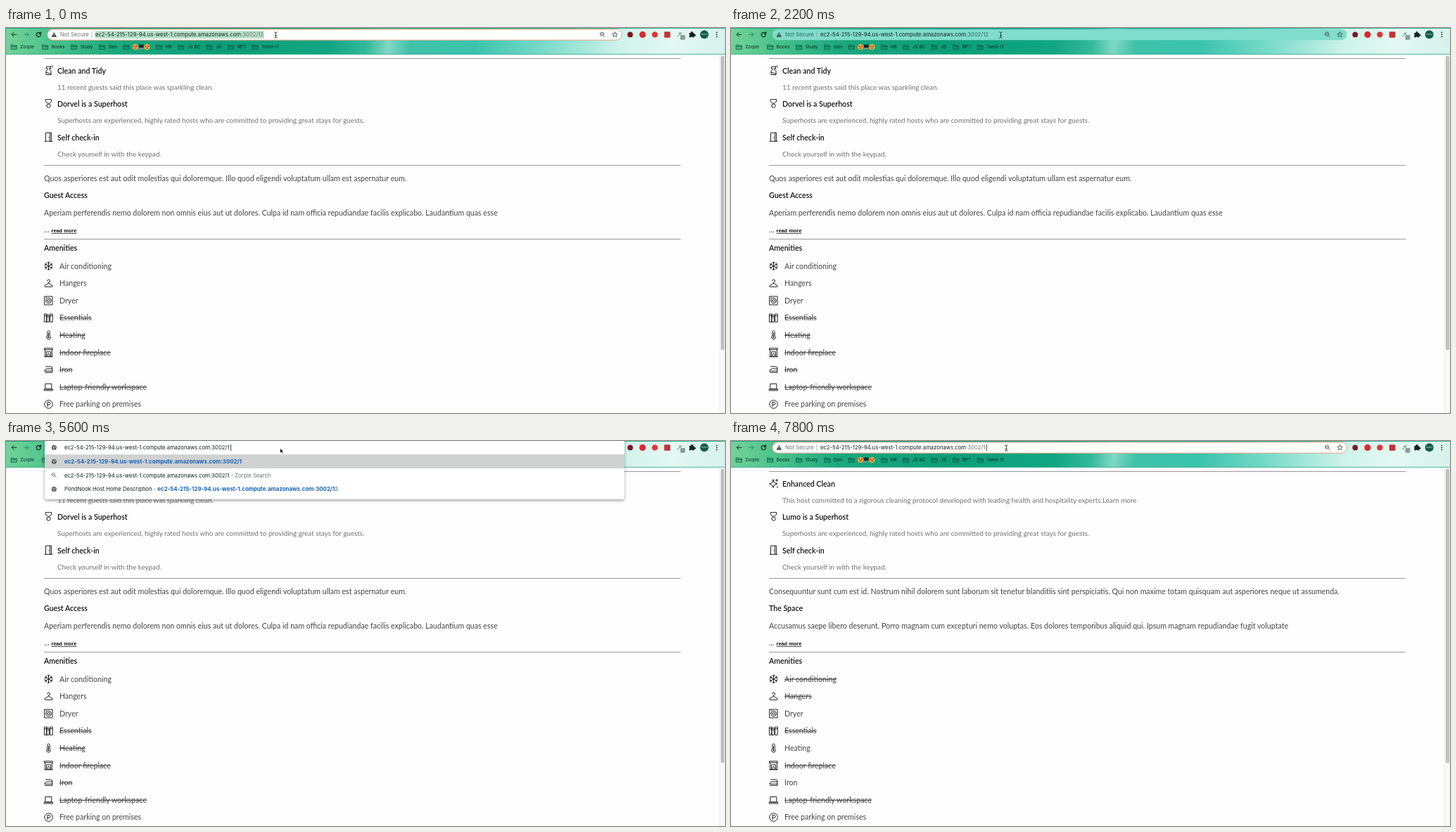
Write an HTML page that moves like this. It is 1022 by 548 pixels and loops after 8 s.

```html
<!DOCTYPE html>
<html lang="en">
<head>
<meta charset="utf-8">
<title>Host home description</title>
<style>
  html, body { margin: 0; width: 100%; height: 100%; overflow: hidden; background: #fefefe; }
  svg { display: block; width: 100vw; height: 100vh; }
  text { white-space: pre; }
  .ui { font-family: Inter, "Liberation Sans", sans-serif; font-size: 7.7px; fill: #10231f; }
  .mark { font-size: 6.5px; fill: #04281e; }
  .dim { fill: #2c6b60; }
  .focus .dim, .muted { fill: #6c6f70; }
  .link { fill: #1765b8; }
  .bold { font-weight: 700; font-size: 7.9px; }
  .status { font-size: 6.45px; fill: #0c574c; }
  .page { font-family: Lato, "Open Sans", sans-serif; font-size: 10.61px; fill: #444; }
  .head { font-size: 10.6px; font-weight: 600; fill: #111; }
  .note { font-size: 9.84px; fill: #717171; }
  .more { font-family: "Liberation Sans", Arial, sans-serif; font-size: 7.4px; font-weight: 700; fill: #111; text-decoration: underline; }
  .off { text-decoration: line-through; }
</style>
</head>
<body>
<svg id="stage" viewBox="0 0 1022 548" preserveAspectRatio="none">
  <defs>
    <linearGradient id="theme" gradientUnits="userSpaceOnUse" x1="0" y1="0" x2="1022" y2="90">
      <stop offset="0" stop-color="#74d398"/>
      <stop offset=".06" stop-color="#4cc48c"/>
      <stop offset=".15" stop-color="#1ba87d"/>
      <stop offset=".3" stop-color="#0b9d78"/>
      <stop offset=".45" stop-color="#12a682"/>
      <stop offset=".5" stop-color="#34ba9b"/>
      <stop offset=".53" stop-color="#7fd8c4"/>
      <stop offset=".56" stop-color="#3fc2a9"/>
      <stop offset=".65" stop-color="#3ac4ad"/>
      <stop offset=".75" stop-color="#7ddccb"/>
      <stop offset=".85" stop-color="#cff3ea"/>
      <stop offset=".92" stop-color="#e4f8f2"/>
      <stop offset="1" stop-color="#d4f2ea"/>
    </linearGradient>
    <filter id="shadow" x="-5%" y="-10%" width="110%" height="130%">
      <feDropShadow dx="0" dy="2" stdDeviation="2" flood-opacity=".35"/>
    </filter>
  </defs>
</svg>
<script>
const LOOP = 8000;
const HOST = 'ec2-54-215-129-94.us-west-1.compute.amazonaws.com';
const PATH = ':3002/1';
const stage = document.getElementById('stage');

function el(tag, attrs, parent = stage, content) {
  const node = document.createElementNS('http://www.w3.org/2000/svg', tag);
  for (const key in attrs) node.setAttribute(key, attrs[key]);
  if (content !== undefined) node.textContent = content;
  return parent.appendChild(node);
}
const group = (parent, attrs = {}) => el('g', attrs, parent);
const rect = (p, x, y, width, height, fill, rx = 0) => el('rect', { x, y, width, height, fill, rx }, p);
const dot = (p, cx, cy, r, fill) => el('circle', { cx, cy, r, fill }, p);
const label = (p, x, y, cls, content) => el('text', { x, y, class: cls }, p, content);
const span = (p, cls, content) => el('tspan', { class: cls }, p, content);
const LINE = { fill: 'none', stroke: '#161616', 'stroke-width': .95, 'stroke-linecap': 'round', 'stroke-linejoin': 'round' };
const icon = (p, x, y, d, extra = {}) =>
  el('path', { ...LINE, d, transform: `translate(${x} ${y})`, ...extra }, p);

// circle as a path fragment, so that an icon stays one path
const ring = (x, y, r) => `M${x - r} ${y}a${r} ${r} 0 1 0 ${2 * r} 0a${r} ${r} 0 1 0 ${-2 * r} 0`;

const ICONS = {
  spray: 'M4 1.5H9L9.5 4H7.5V5.5L10 8V13H3V8L5 5.5V4H3.5ZM3 9.5L10 12M9 1.5L11 .8M11.8 2.5H12.3M11.8 .5H12.3M9 4L10 5.5',
  sparkle: 'M6 1.5L7.4 5.8L12 7.5L7.4 9.2L6 13L4.6 9.2L.5 7.5L4.6 5.8ZM11 .8V4M9.4 2.4H12.6M11.8 11V13',
  medal: 'M2.5 .8H10.5V4L6.5 6.8L2.5 4Z' + ring(6.5, 9.8, 2.7),
  door: 'M2.5 13V.8H10.5V13M1 13H12M8.5 .8V13M6.8 7V7.6',
  snow: 'M6.5 1V13M1.3 4L11.7 10M11.7 4L1.3 10M4.7 1.8L6.5 3.4L8.3 1.8M4.7 12.2L6.5 10.6L8.3 12.2M1 6L3.3 5.2L2.9 2.8M12 6L9.7 5.2L10.1 2.8M1 8L3.3 8.8L2.9 11.2M12 8L9.7 8.8L10.1 11.2',
  hanger: 'M4.7 3.6A1.9 1.9 0 1 1 6.5 5.5V6.8L12 10.3Q13 12 11.3 12H1.7Q0 12 1 10.3L6.5 6.8',
  dryer: 'M1 1H12V13H1Z' + ring(6.5, 7, 3.8) + ring(6.5, 7, 1.7) + 'M2.6 2.6H3.4',
  books: 'M.8 1.5H4V12.8H.8ZM4 3H7.2V12.8H4ZM9 1.5H12.2V12.8H9ZM.8 4H4M4 5.5H7.2M9 4H12.2',
  heat: 'M4.8 8V2.5A1.7 1.7 0 0 1 8.2 2.5V8A2.8 2.8 0 1 1 4.8 8ZM6.5 4V9.5' + ring(6.5, 10.3, .8),
  fire: 'M.8 1H12.2V3H.8ZM1.6 3V13H3.5V6H9.5V13H11.4V3M.8 13H12.2M5 12.5Q4.5 9.5 6.5 8Q8.7 10 8 12.5Z',
  iron: 'M.8 8.5Q1.5 5.5 5 5.5H11.8V8.5ZM2.5 2.5H10.5Q11.8 2.8 11.8 5.5M1.5 11H11.8V8.5',
  laptop: 'M2.2 2.5H10.8V10H2.2ZM.6 10H12.4V12H.6Z',
  park: ring(6.5, 7, 5.8) + 'M5 10.2V4H7.1A1.9 1.9 0 0 1 7.1 7.8H5',
};

const AMENITIES = [
  ['snow', 'Air conditioning'], ['hanger', 'Hangers'], ['dryer', 'Dryer'],
  ['books', 'Essentials'], ['heat', 'Heating'], ['fire', 'Indoor fireplace'],
  ['iron', 'Iron'], ['laptop', 'Laptop-friendly workspace'], ['park', 'Free parking on premises'],
];

const HOMES = {
  first: {
    perk: ['spray', 'Clean and Tidy', '11 recent guests said this place was sparkling clean.'],
    host: 'Dorvel',
    intro: 'Quos asperiores est aut odit molestias qui doloremque. Illo quod eligendi voluptatum ullam est aspernatur eum.',
    title: 'Guest Access',
    body: 'Aperiam perferendis nemo dolorem non omnis eius aut ut dolores. Culpa id nam officia repudiandae facilis explicabo. Laudantium quas esse',
    missing: [3, 4, 5, 6, 7],
  },
  second: {
    perk: ['sparkle', 'Enhanced Clean', 'This host committed to a rigorous cleaning protocol developed with leading health and hospitality experts.Learn more'],
    host: 'Lumo',
    intro: 'Consequuntur sunt cum est id. Nostrum nihil dolorem sunt laborum sit tenetur blanditiis sint perspiciatis. Qui non maxime totam quisquam aut asperiores neque ut assumenda.',
    title: 'The Space',
    body: 'Accusamus saepe libero deserunt. Porro magnam cum excepturi nemo voluptas. Eos dolores temporibus aliquid qui. Ipsum magnam repudiandae fugit voluptate',
    missing: [0, 1, 3, 5, 7],
  },
};

const rule = (p, y, right) => rect(p, 54, y, right - 54, 1, '#999');

function buildHome(home) {
  const g = group(stage);
  [43, 195, 300].forEach(y => rule(g, y, 959));
  const perks = [
    home.perk,
    ['medal', `${home.host} is a Superhost`, 'Superhosts are experienced, highly rated hosts who are committed to providing great stays for guests.'],
    ['door', 'Self check-in', 'Check yourself in with the keypad.'],
  ];
  perks.forEach(([name, title, note], i) => {
    const y = 61 + 47.4 * i;
    icon(g, 54, y - 7.5, ICONS[name]);
    label(g, 73, y + 3.9, 'page head', title);
    label(g, 73, y + 26.7, 'page note', note);
  });
  label(g, 54, 217.6, 'page', home.intro);
  label(g, 54, 242.2, 'page head', home.title);
  label(g, 54, 267, 'page', home.body);
  label(g, 54, 291.4, 'page', '...');
  label(g, 64.5, 291.3, 'more', 'read more');
  label(g, 54, 317.3, 'page head', 'Amenities');
  AMENITIES.forEach(([name, title], i) => {
    const y = 338.8 + 24.6 * i;
    icon(g, 54, y - 7, ICONS[name]);
    label(g, 76, y + 3.7, home.missing.includes(i) ? 'page off' : 'page', title);
  });
  rect(g, 1014, 38, 8, 510, '#f8f8f8');
  rect(g, 1014, 38, .6, 510, '#e4e4e4');
  rect(g, 1016, 39.5, 5, 419, '#c0c0c0', 2.5);
  return g;
}

function buildBlank() {
  const g = group(stage);
  [43, 49, 55].forEach(y => rule(g, y, 967));
  return g;
}

function globe(p, x, y) {
  dot(p, x, y, 3.5, '#4d5254');
  icon(p, x, y, 'M-2.4 -1.2L-.6 -.6L-1 1L.2 2.4M.6 -2.4L2 -.8L1 .6', { stroke: '#fff', 'stroke-width': .8 });
}

function buildChrome() {
  const g = group(stage);
  rect(g, 0, 0, 1022, 37.5, 'url(#theme)');
  rect(g, 0, 0, 1022, .8, '#169f83');
  rect(g, 0, 36.8, 1022, .9, '#3aa98f');
  icon(g, 11.5, 9.3, 'M3.4 0H-3.3M-.3 -3L-3.3 0L-.3 3', { stroke: '#082a20' });
  icon(g, 28.8, 9.3, 'M-3.4 0H3.3M.3 -3L3.3 0L.3 3', { stroke: '#26856a' });
  icon(g, 46.3, 9.3, 'M2.6 -1.6A3.1 3.1 0 1 0 3 .8M3.2 -3.4V-1H.8', { stroke: '#061d16', 'stroke-width': 1.2 });

  const marks = [[7, 'Zorple'], [51.5, 'Books'], [92.5, 'Study'], [132.5, 'Gen'], [167, ''],
    [213.5, 'HR'], [244.5, 'JS BC'], [285, 'JS'], [315.5, 'RPT'], [350, 'Tamil-IT']];
  for (const [x, name] of marks) {
    icon(g, x, 23, 'M.5 1H3.2L4 2H8.2V7.2H.5ZM.5 3.3H8.2', { stroke: '#0a5a45', 'stroke-width': .8, fill: '#0a5a4533' });
    label(g, x + 13.2, 29.3, 'ui mark', name);
  }
  for (const x of [184, 200.5]) {
    dot(g, x, 27, 3.9, '#f2b53a');
    dot(g, x - 1.7, 26, 1.2, '#df3a3f');
    dot(g, x + 1.7, 26, 1.2, '#df3a3f');
    rect(g, x - 1.5, 28, 3, 1.2, '#6b3b17', .6);
  }
  rect(g, 189, 23.5, 6.5, 4.5, '#20282c', .5);
  rect(g, 188, 28.2, 8.5, 2.3, '#7c8d91', .5);

  dot(g, 887.2, 9.4, 3.9, '#7d1524');
  dot(g, 904.8, 9.4, 4.6, '#df2730');
  dot(g, 922.3, 9.4, 4.2, '#e33434');
  rect(g, 935.6, 5.2, 8.6, 8.6, '#c92f35', .8);
  icon(g, 957, 9, 'M-2.5 3L1 -.5M0 -2L2.3 .3M1.4 -1L3 -2.6', { stroke: '#46615b' });
  rect(g, 958.5, 10, 6.8, 6.8, '#8b9a98', 1);
  el('path', { d: 'M971.2 7H973.5A1.5 1.5 0 1 1 976.3 7H978.2V9A1.5 1.5 0 1 1 978.2 11.6V13.2H975.6A1.2 1.2 0 0 0 973.4 13.2H971.2V10.8A1.2 1.2 0 0 0 971.2 8.7Z', fill: '#12211d' }, g);
  dot(g, 992.6, 9.3, 6, '#135c49');
  el('text', { x: 992.6, y: 10.4, class: 'ui', 'text-anchor': 'middle', style: 'font-size:3.6px;fill:#b9ddd1' }, g, 'home');
  for (const y of [6.4, 9.4, 12.4]) dot(g, 1010.3, y, .95, '#18312b');
}

function buildBar() {
  const g = group(stage);
  const field = rect(g, 58.8, 1.8, 816.6, 15.4, '#80dccb', 7.7);
  const selection = rect(g, 126.5, 4, 240.5, 11, '#b9e2c9');
  el('path', { d: 'M68.3 5.8L72.2 12.7H64.4Z', fill: '#3d5550' }, g);
  rect(g, 68, 8, .7, 2.4, '#d8f2ec');
  label(g, 77, 12.2, 'ui dim', 'Not Secure');
  rect(g, 121.6, 5, .7, 9, '#7fa9a0');
  const line = label(g, 127, 12.2, 'ui');
  span(line, '', HOST);
  const tail = span(line, 'dim', PATH);
  icon(g, 847.5, 9, ring(-.4, -.4, 2.6) + 'M1.6 1.6L3.6 3.6M-1.6 -.4H.8', { stroke: '#3d5550', 'stroke-width': .9 });
  icon(g, 865.5, 9.3, 'M0 -3.7L1.1 -1.2L3.7 -1L1.7 .8L2.3 3.4L0 2L-2.3 3.4L-1.7 .8L-3.7 -1L-1.1 -1.2Z', { stroke: '#3d5550', 'stroke-width': .9 });
  const caret = rect(g, 363, 4.8, .8, 9.4, '#16322b');
  return { g, field, selection, tail, caret };
}

function buildEdit() {
  const g = group(stage);
  const field = rect(g, 58.8, 1.8, 816.6, 15.4, '#fff', 7.7);
  const list = group(g);
  el('path', { d: 'M55 -6H879V79Q879 83 875 83H59Q55 83 55 79Z', fill: '#fff', filter: 'url(#shadow)' }, list);
  rect(list, 55, 19.2, 824, 19.8, '#d0d1d1');
  globe(list, 68.3, 29.2);
  globe(list, 68.3, 68.6);
  icon(list, 68, 48.4, ring(-.6, -.6, 2.2) + 'M1.1 1.1L3.2 3.2', { stroke: '#666', 'stroke-width': .9 });
  label(list, 83, 31.9, 'ui link bold', HOST + PATH);
  const search = label(list, 83, 51.5, 'ui', HOST + PATH);
  span(search, 'muted', ' - Zorple Search');
  const visit = label(list, 83, 71.3, 'ui', 'PondNook Host Home Description');
  span(visit, 'muted', ' - ');
  span(visit, 'link bold', HOST + PATH);
  span(visit, 'link', '2');
  globe(g, 68.3, 9.3);
  label(g, 83, 12.2, 'ui', HOST + PATH);
  const caret = rect(g, 319.3, 4.6, .8, 9.6, '#111');
  return { g, field, list, caret };
}

function buildStatus() {
  const g = group(stage);
  el('path', { d: 'M0 538H337Q340 538 340 541V548H0Z', fill: '#34c7b4' }, g);
  label(g, 2, 545.7, 'ui status', `Waiting for ${HOST}...`);
  return g;
}

const pages = { first: buildHome(HOMES.first), second: buildHome(HOMES.second), blank: buildBlank() };
buildChrome();
const bar = buildBar();
const edit = buildEdit();
const status = buildStatus();
const beam = icon(stage, 0, 0, 'M-1.8 -4.2Q0 -4.2 0 -3V3Q0 4.2 -1.8 4.2M1.8 -4.2Q0 -4.2 0 -3M0 3Q0 4.2 1.8 4.2M-1 .8H1', { stroke: '#10221d', 'stroke-width': .8 });
const arrow = el('path', { d: 'M0 0V6.6L1.6 5.2L2.7 7.6L3.8 7.1L2.7 4.8H4.7Z', fill: '#000', stroke: '#fff', 'stroke-width': .5 });

// each step keeps what the earlier ones set
const STEPS = [
  [0, { page: 'first', tail: '2', focus: true, selected: true, caret: false, edit: false, list: false, status: false }],
  [200, { focus: false, selected: false }],
  [400, { status: true }],
  [1000, { status: false, page: 'blank' }],
  [1200, { page: 'first' }],
  [3200, { focus: true }],
  [4000, { edit: true, caret: true, tail: '' }],
  [4800, { list: true }],
  [5200, { caret: false }],
  [5600, { caret: true }],
  [6000, { edit: false, list: false, focus: false, caret: false }],
  [6200, { status: true }],
  [6400, { status: false, page: 'blank' }],
  [6800, { page: 'second' }],
  [7600, { focus: true, caret: true }],
];

// pointer path: time, x, y
const POINTER = [[0, 383.5, 10], [2200, 383.5, 10], [2800, 365, 11], [3399, 365, 11],
  [3400, 390, 10.5], [7200, 390, 10.5], [7600, 391.3, 10], [LOOP, 391.3, 10]];

function pointerAt(t) {
  const i = POINTER.findIndex(p => p[0] > t);
  const [a, b] = [POINTER[i - 1], POINTER[i]];
  const k = (t - a[0]) / (b[0] - a[0]);
  return [a[1] + (b[1] - a[1]) * k, a[2] + (b[2] - a[2]) * k];
}

const show = (node, on) => node.setAttribute('display', on ? 'inline' : 'none');

function draw(now) {
  const t = now % LOOP;
  const s = Object.assign({}, ...STEPS.filter(step => step[0] <= t).map(step => step[1]));
  for (const name in pages) show(pages[name], name === s.page);
  show(status, s.status);
  show(bar.g, !s.edit);
  show(bar.selection, s.selected);
  show(bar.caret, s.caret);
  bar.g.setAttribute('class', s.focus ? 'focus' : '');
  bar.field.setAttribute('fill', s.focus ? '#fff' : '#80dccb');
  bar.field.setAttribute('stroke', s.focus ? '#e0a37e' : 'none');
  if (bar.tail.textContent !== PATH + s.tail) bar.tail.textContent = PATH + s.tail;
  show(edit.g, s.edit);
  show(edit.list, s.list);
  show(edit.field, !s.list);
  show(edit.caret, s.caret);
  const [x, y] = pointerAt(t);
  beam.setAttribute('transform', `translate(${x} ${y})`);
  arrow.setAttribute('transform', `translate(${x - .2} ${y})`);
  show(beam, !s.edit);
  show(arrow, s.edit);
}

function tick() {
  draw(performance.now());
  requestAnimationFrame(tick);
}
tick();
</script>
</body>
</html>
```
